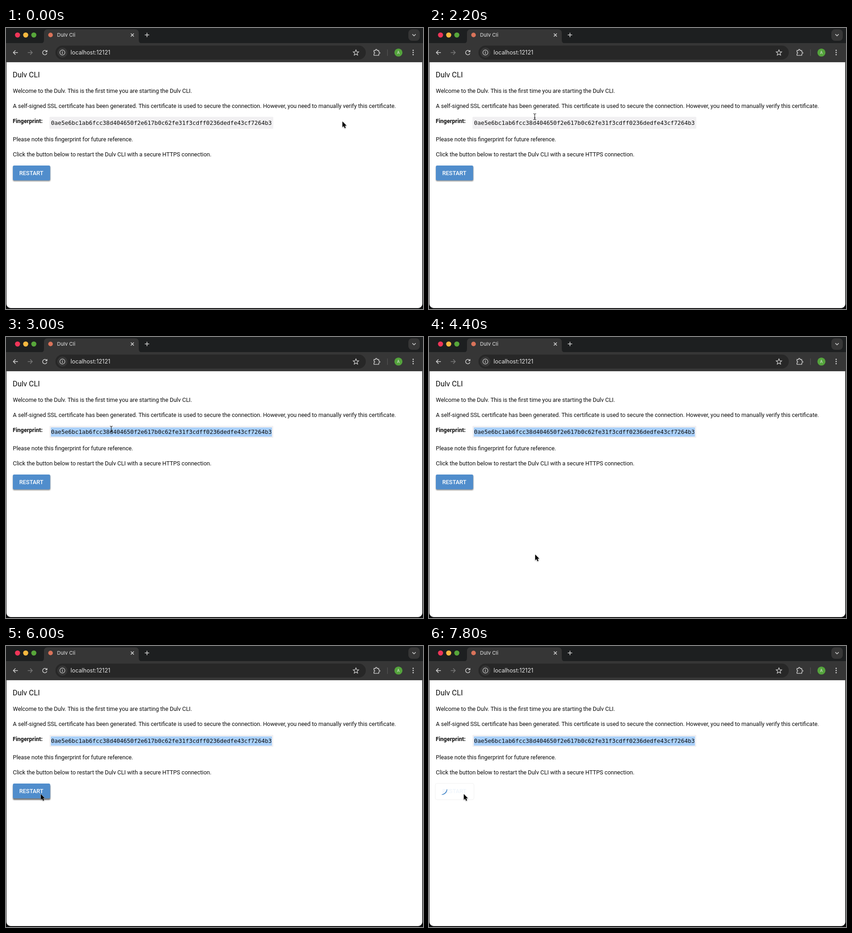
Write an HTML page that moves like this. It is 911x615 px and loops after 8 s.

```html
<!DOCTYPE html>
<html lang="en">
<head>
<meta charset="utf-8">
<title>Dulv Cli</title>
<style>
  html, body { margin: 0; width: 100%; height: 100%; overflow: hidden; background: #0b0c0d; }
  svg { display: block; }
  .page { font: 12.5px Roboto, sans-serif; fill: #0c0c0c; }
  .ui { font-family: Inter, sans-serif; fill: #e6e6e6; }
  .line { fill: none; stroke: #cfcfcf; stroke-width: 1.5; }
  .code { font: 12.53px "DejaVu Sans Mono", monospace; }
  .label { font-weight: 500; }
</style>
</head>
<body>
<svg width="911" height="615" viewBox="0 0 911 615">
  <defs>
    <filter id="soft" x="-30%" y="-30%" width="160%" height="180%"><feGaussianBlur stdDeviation="1.3"/></filter>
  </defs>

  <!-- window -->
  <rect width="911" height="615" fill="#0b0c0d"/>
  <path d="M1 0H909.5V604a9 9 0 0 1-9 9H10a9 9 0 0 1-9-9Z" fill="#fff"/>
  <rect width="911" height="34" fill="#1d1f20"/>
  <rect y="33" width="911" height="41.5" fill="#363636"/>
  <rect y="74" width="911" height="1" fill="#484848"/>

  <!-- tab strip -->
  <circle cx="25.2" cy="15.3" r="5.6" fill="#ee3558"/>
  <circle cx="43" cy="15.3" r="5.6" fill="#f5b83f"/>
  <circle cx="60.8" cy="15.3" r="5.6" fill="#57a63a"/>
  <path d="M75 34q8 0 8-8V11q0-8 8-8H282q8 0 8 8V26q0 8 8 8Z" fill="#363636"/>
  <circle cx="97.3" cy="15.2" r="5" fill="#d9735a"/>
  <text class="ui" x="111.5" y="19" font-size="11">Dulv Cli</text>
  <path class="line" d="M272.7 12l6.6 6.6m0-6.6l-6.6 6.6M303.2 15.3h9.6m-4.8-4.8v9.6"/>
  <rect x="879" y="3" width="25" height="25" rx="8" fill="#363636"/>
  <path class="line" d="M887.8 13.6l3.6 3.6 3.6-3.6"/>

  <!-- toolbar -->
  <rect x="108" y="38.5" width="678" height="30.5" rx="15.2" fill="#272727"/>
  <path class="line" d="M26 53.7H16m4.7-4.7L16 53.7l4.7 4.7"/>
  <path class="line" d="M47.5 53.7h10m-4.7-4.7l4.7 4.7-4.7 4.7" style="stroke:#777"/>
  <path class="line" d="M88.9 51.3A4.8 4.8 0 1 0 89.4 55.3M89.6 48.6v3.4h-3.6"/>
  <circle cx="123.2" cy="53.7" r="11" fill="#363636"/>
  <circle class="line" cx="123.2" cy="53.7" r="5.5" style="stroke-width:1.2"/>
  <path class="line" d="M123.2 52.8v3.7m0-5.8v1.2" style="stroke-width:1.4"/>
  <text class="ui" x="141" y="58.2" font-size="12.4">localhost:12121</text>
  <path id="star" class="line" style="stroke-width:1.25"/>
  <path class="line" style="stroke-width:1.4" d="M803.8 49.2h3.4v-.8a1.7 1.7 0 0 1 3.4 0v.8h3.8v3.6h.6a1.8 1.8 0 0 1 0 3.6h-.6v3.5h-10.6v-3.5a1.8 1.8 0 0 0 0-3.6Z"/>
  <path d="M833.3 47v14" stroke="#5c5c5c"/>
  <circle cx="857.3" cy="53.7" r="8.8" fill="#54a33c"/>
  <text class="ui" x="857.3" y="57" font-size="8.5" text-anchor="middle">A</text>
  <g fill="#cfcfcf">
    <circle cx="889.5" cy="49" r="1.4"/><circle cx="889.5" cy="53.7" r="1.4"/><circle cx="889.5" cy="58.4" r="1.4"/>
  </g>

  <!-- page -->
  <g class="page">
    <text x="14.5" y="107.5" font-size="16.3">Dulv CLI</text>
    <text x="15" y="142.3">Welcome to the Dulv. This is the first time you are starting the Dulv CLI.</text>
    <text x="15" y="175.3">A self-signed SSL certificate has been generated. This certificate is used to secure the connection. However, you need to manually verify this certificate.</text>
    <text x="14.7" y="208.4" font-weight="700">Fingerprint:</text>
    <rect x="95" y="194.5" width="489" height="26" rx="1.5" fill="#f1f0f2"/>
    <rect id="mark" x="98" y="198" width="483" height="20" fill="#a9d0fa"/>
    <text class="code" x="98.3" y="212">0ae5e6bc1ab6fcc38d404650f2e617b0c62fe31f3cdff0236dedfe43cf7264b3</text>
    <text x="15" y="248.3">Please note this fingerprint for future reference.</text>
    <text x="15" y="281.4">Click the button below to restart the Dulv CLI with a secure HTTPS connection.</text>
  </g>

  <g id="rest" class="page">
    <rect x="13.8" y="300.5" width="84.4" height="36" rx="4" fill="#fff" stroke="#f1f1f1"/>
    <text class="label" x="29" y="322" fill="#eff5fb">RESTART</text>
  </g>
  <g id="button" class="page">
    <rect id="shade" x="15" y="302" width="82" height="33" rx="3" filter="url(#soft)"/>
    <rect x="15" y="301" width="81.5" height="32.5" rx="3" fill="#508dcc"/>
    <circle id="ripple" cx="76" cy="324" fill="#fff" opacity=".2" clip-path="inset(0)"/>
    <text class="label" x="29" y="322" fill="#fff">RESTART</text>
  </g>
  <path id="spin" d="M20.2 305.9A11.4 11.4 0 0 1 35.8 305.9A13.5 13.5 0 0 0 20.2 305.9Z" fill="#4486c8" stroke="#4486c8" stroke-width="1.2" stroke-linejoin="round"/>

  <!-- pointers -->
  <path id="arrow" d="M0 0V12.6L2.9 10L5 14.8L7.2 13.8L5.1 9.2H9Z" fill="#000" stroke="#fff" stroke-width="1" paint-order="stroke" style="filter:drop-shadow(0 1px 1px rgba(0,0,0,.35))"/>
  <path id="beam" d="M-3-6.5q2.4 0 3 1.2q.6-1.2 3-1.2M-3 6.5q2.4 0 3-1.2q.6 1.2 3 1.2M0-5.5v11M-1.5 2.5h3" fill="none" stroke="#111" stroke-width="1.1"/>
</svg>
<script>
const LOOP = 8000, STEP = 200;
const $ = id => document.getElementById(id);
const show = (id, on) => { $(id).style.display = on ? '' : 'none'; };
const place = (id, x, y) => $(id).setAttribute('transform', `translate(${x} ${y})`);

// time, x, y of the pointer
const path = [
  [0, 735, 204.5], [1000, 712, 193], [1200, 622, 160], [1400, 510, 138],
  [1600, 444, 132.5], [1800, 330, 148], [2000, 232, 185],
  [2200, 231, 194], [2400, 231, 198], [2600, 230, 200], [2800, 230, 201.5],
  [3200, 222, 298], [3400, 222, 484], [3800, 229, 480], [4000, 232.5, 477.5],
  [4400, 232, 476], [4600, 196, 440], [4800, 130, 380], [5000, 72, 330], [5200, 76, 324]
];

const star = Array.from({ length: 10 }, (_, i) => {
  const a = Math.PI * (i / 5 - .5), r = i % 2 ? 2.9 : 6.4;
  return `${764.5 + r * Math.cos(a)} ${54.2 + r * Math.sin(a)}`;
});
$('star').setAttribute('d', `M${star.join('L')}Z`);
$('ripple').style.clipPath = 'none';

function draw(now) {
  const t = Math.floor(now % LOOP / STEP) * STEP;
  const [, x, y] = path.findLast(p => p[0] <= t);
  const overText = t >= 2200 && t < 3200;
  show('arrow', !overText);
  show('beam', overText);
  place(overText ? 'beam' : 'arrow', x, y);
  show('mark', t >= 3000);

  const hover = t >= 6000;
  $('shade').setAttribute('y', hover ? 304 : 302.5);
  $('shade').setAttribute('fill', hover ? 'rgba(0,0,0,.52)' : 'rgba(0,0,0,.42)');
  $('ripple').setAttribute('r', t === 6200 ? 5 : t === 6400 ? 9 : 0);

  const loading = t >= 6800;
  show('button', !loading);
  $('button').style.opacity = t === 6600 ? .55 : 1;
  show('rest', loading);
  show('spin', loading);
  const turn = 135 + (t - 7800) * .36;
  $('spin').setAttribute('transform', `rotate(${turn} 28 314)`);
}

function tick() {
  draw(performance.now());
  requestAnimationFrame(tick);
}
tick();
</script>
</body>
</html>
```
